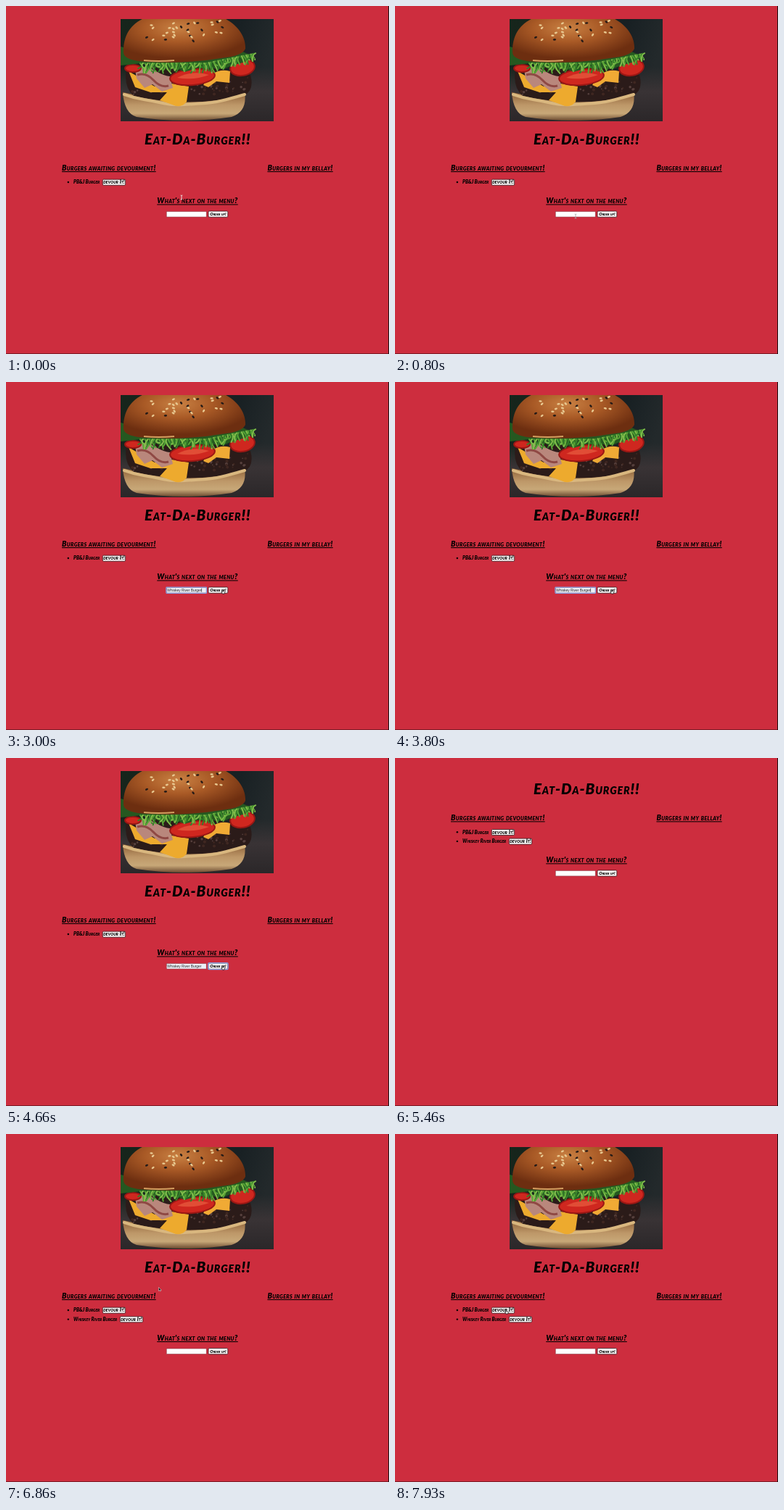
These frames come from a looping animation (528x480 px, 8 s). An HTML page:

```html
<!DOCTYPE html>
<html lang="en">
<head>
<meta charset="utf-8">
<title>Eat-Da-Burger!!</title>
<style>
  html, body { margin: 0; width: 100%; height: 100%; overflow: hidden; background: #cd2d3e; }
  svg { display: block; }
  .marker { font-family: Lato, "Open Sans", sans-serif; font-weight: 900; font-style: italic; font-variant: small-caps; }
  .title { font-size: 20.4px; letter-spacing: .045em; }
  .head { font-size: 10.3px; letter-spacing: .036em; text-decoration: underline; }
  .item { font-size: 6.5px; }
  .button rect { fill: #fbf8f8; stroke: #32171b; stroke-width: .8; }
  .button text { font-size: 6.6px; letter-spacing: .03em; text-anchor: middle; }
  .button .order { font-size: 5.7px; letter-spacing: 0; }
  .ring { fill: none; stroke: #85a5e8; stroke-width: 1.2; }
  .typed { font: 4.87px "Liberation Sans", Arial, sans-serif; fill: #222; }
  .pointer { fill: #fff; stroke: #000; stroke-width: .7; stroke-linejoin: round; }
</style>
</head>
<body>
<svg width="528" height="480" viewBox="0 0 528 480">
  <defs>
    <clipPath id="frame"><path d="M158 18H369V159H158z"/></clipPath>
    <filter id="soft"><feGaussianBlur stdDeviation=".5"/></filter>
    <linearGradient id="backdrop" x2="1" y2=".2">
      <stop stop-color="#16251b"/><stop offset=".75" stop-color="#182023"/><stop offset="1" stop-color="#23292b"/>
    </linearGradient>
    <linearGradient id="table" x2="0" y2="1">
      <stop stop-color="#3a3335" stop-opacity="0"/><stop offset=".45" stop-color="#393335"/><stop offset="1" stop-color="#2b2729"/>
    </linearGradient>
    <radialGradient id="crown" cx=".45" cy=".3" r=".62">
      <stop stop-color="#c98143"/><stop offset=".45" stop-color="#a95a26"/><stop offset="1" stop-color="#6d2e10"/>
    </radialGradient>
    <linearGradient id="heel" x2="0" y2="1">
      <stop stop-color="#8d6138"/><stop offset=".45" stop-color="#bd9768"/><stop offset=".75" stop-color="#c8a878"/><stop offset="1" stop-color="#6b4a30"/>
    </linearGradient>
  </defs>
  <rect width="528" height="480" fill="#cd2d3e"/>

  <g id="page">
    <g id="photo" clip-path="url(#frame)">
      <path fill="url(#backdrop)" d="M158 18H369V159H158z"/>
      <path fill="url(#table)" d="M158 84H369V159H158z"/>
      <g filter="url(#soft)">
        <path fill="url(#heel)" d="M161 119Q245 138 329 119Q333 146 311 153Q246 163 180 153Q163 148 161 119z"/>
        <path fill="#2b1b19" d="M166 88Q250 74 337 95Q343 117 327 124Q250 141 176 124Q162 112 166 88z"/>
        <g id="crumbs"/>
        <path fill="none" stroke="#d9b77f" stroke-width="4" stroke-linecap="round" d="M163 122Q177 127 190 129T216 134T246 136T276 134T304 129T329 122"/>
        <path fill="#edaa2e" d="M169 90L205 111L222 106L252 111L249 132Q241 142 229 136L212 130L222 119L199 119L178 112z"/>
        <path fill="#f0aa35" d="M272 109Q286 84 309 90L308 106L290 104L279 112z"/>
        <path fill="#b9877c" d="M178 88Q191 81 205 89T226 97L230 113L215 118L202 108L191 113L180 100z"/>
        <path fill="none" stroke="#8f4944" stroke-width="3" d="M181 95Q193 91 203 102T224 110"/>
        <g fill="#cf271f" stroke="#9b1714" stroke-width="2">
          <ellipse cx="257" cy="98" rx="31" ry="11" transform="rotate(-5 257 98)"/>
          <ellipse cx="326" cy="85" rx="17" ry="11" transform="rotate(-10 326 85)"/>
          <ellipse cx="175" cy="86" rx="11" ry="5"/>
        </g>
        <path fill="#e14d36" d="M236 99Q257 88 280 95Q258 103 236 99z"/>
        <path fill="#255820" d="M158 56Q174 60 188 68L222 75L270 72L324 62L338 68L330 77L312 82L300 87L266 85L246 91L235 86L211 87L196 78L177 80L158 82z"/>
        <g id="leaves" fill="none" stroke-width="2" stroke-linecap="round"/>
        <path fill="url(#crown)" d="M162 65C161 36 176 16 214 10H281C314 17 331 39 330 59Q326 68 303 71Q252 80 196 77Q164 76 162 65z"/>
        <path fill="none" stroke="#d49f60" stroke-width="2" d="M190 75Q210 77 232 75"/>
        <g id="seeds"/>
      </g>
    </g>

    <g class="marker">
      <text class="title" x="264.3" y="191" text-anchor="middle">Eat-Da-Burger!!</text>
      <text class="head" x="77" y="227">Burgers awaiting devourment!</text>
      <text class="head" x="450.7" y="227" text-anchor="end">Burgers in my bellay!</text>
      <circle cx="85.8" cy="243" r="1.2"/>
      <text class="item" x="93" y="245.3">PB&amp;J Burger</text>
      <g class="button"><rect x="133.3" y="239.2" width="31.3" height="8" rx="1.3"/><text x="149" y="245.4">devour It!</text></g>
      <g id="added">
        <circle cx="85.8" cy="255.6" r="1.2"/>
        <text class="item" x="93" y="257.9">Whiskey River Burger</text>
        <g class="button"><rect x="157.3" y="251.8" width="31.3" height="8" rx="1.3"/><text x="173" y="258">devour It!</text></g>
      </g>
    </g>

    <g id="form">
      <text class="marker head" x="264" y="272.4" text-anchor="middle">What's next on the menu?</text>
      <rect id="field" x="221.2" y="283.4" width="55" height="7.6" stroke="#8c3a45" stroke-width=".6"/>
      <rect id="fieldRing" class="ring" x="220.9" y="283.1" width="55.6" height="8.2" rx=".8"/>
      <text id="typed" class="typed" x="222.3" y="289"></text>
      <path id="caret" stroke="#111" stroke-width=".6" d="M0 284.6v5"/>
      <g class="button marker"><rect x="279" y="283" width="26.8" height="8.2" rx="1.3"/><text class="order" x="292.4" y="289.2">Order up!</text></g>
      <rect id="buttonRing" class="ring" x="278.6" y="282.6" width="27.6" height="9" rx="1.6"/>
    </g>
  </g>

  <g id="cursor">
    <path id="beam" fill="none" stroke="#eee" stroke-width=".9" d="M-1.3-3Q0-3 0-2Q0-3 1.3-3M0-2V2M-1.3 3Q0 3 0 2Q0 3 1.3 3"/>
    <path id="arrow" class="pointer" style="fill:#111;stroke:#eee;stroke-width:.5" d="M-1-2.5V2.5L.2 1.4L1 3L1.9 2.6L1.1 1.1H2.7z"/>
    <path id="hand" class="pointer" d="M-.9 1V-2.2Q-.3-3 .3-2.2V-.4L2.3 0Q2.9.3 2.6 1.4L2 3H-.6L-2.2.8Q-1.9 0-.9 1z"/>
  </g>
  <path fill="#7c1d28" d="M0 479h528v1H0z"/>
  <path fill="#1c0d10" d="M527 0h1v480h-1z"/>
</svg>
<script>
const LOOP = 8000, ORDER = "Whiskey River Burger";
const RELOAD = 5400, LOADED = 5650;
const $ = id => document.getElementById(id);
const show = (id, on) => $(id).style.display = on ? "" : "none";

let seed = 7;
const rand = (a, b) => a + (b - a) * ((seed = seed * 16807 % 2147483647) / 2147483647);
const repeat = (n, make) => Array.from({ length: n }, (_, i) => make(i)).join("");

$("seeds").innerHTML = repeat(32, i => {
  const x = rand(194, 305), y = rand(19, 53 - Math.abs(x - 245) * .15);
  return `<ellipse cx="${x}" cy="${y}" rx="2.2" ry="1.3" fill="${i % 3 ? "#e8c890" : "#251b18"}" transform="rotate(${rand(-60, 60)} ${x} ${y})"/>`;
});
$("leaves").innerHTML = repeat(75, i => {
  const x = 185 + i * 2.15, y = 79 - Math.max(0, x - 275) * .2;
  return `<path stroke="${["#58a536", "#347f29", "#82bd4c"][i % 3]}" d="M${x} ${y}q${rand(-6, 6)} ${rand(2, 6)} ${rand(-5, 6)} ${rand(5, 14)}"/>`;
});
$("crumbs").innerHTML = repeat(70, i =>
  `<circle cx="${rand(174, 334)}" cy="${rand(98, 122)}" r="${rand(.8, 2.3)}" fill="${i % 2 ? "#57413e" : "#3f2721"}"/>`);

// Cursor stops: time, x, y
const path = [
  [0, 242, 264], [60, 242, 264], [460, 249, 290], [2200, 249, 290],
  [2480, 270, 324], [2900, 299, 289], [5650, 299, 289],
  [6400, 222, 218], [6860, 211.5, 214], [7600, 153.5, 245], [8000, 153.5, 245]
];

function cursorAt(t) {
  const i = path.findIndex(p => p[0] > t);
  const [t0, x0, y0] = path[i - 1], [t1, x1, y1] = path[i];
  const u = (t - t0) / (t1 - t0), k = u * u * (3 - 2 * u);
  return [x0 + (x1 - x0) * k, y0 + (y1 - y0) * k];
}

function draw(t) {
  const loading = t >= RELOAD && t < LOADED, ordered = t >= RELOAD;
  const focused = t >= 1150 && t < 3900;
  const count = ordered ? 0 : Math.floor(Math.max(0, Math.min(1, (t - 1800) / 850)) * ORDER.length);

  $("page").setAttribute("transform", `translate(0 ${loading ? -140.7 : 0})`);
  $("form").setAttribute("transform", `translate(0 ${ordered ? 12.6 : 0})`);
  show("photo", !loading);
  show("added", ordered);

  $("typed").textContent = ORDER.slice(0, count);
  $("field").setAttribute("fill", count ? "#edf0f7" : "#fff");
  show("fieldRing", focused);
  show("buttonRing", t >= 3900 && !ordered);
  show("caret", focused && count > 0);
  $("caret").setAttribute("transform", `translate(${222.6 + $("typed").getComputedTextLength()} 0)`);

  const [x, y] = cursorAt(t);
  const hand = t >= 2800 && t < RELOAD || t >= 7450;
  const beam = t < 2250;
  $("cursor").setAttribute("transform", `translate(${x} ${y})`);
  $("beam").setAttribute("stroke", y > 283 ? "#aaa" : "#eee");
  show("cursor", !loading && !(t >= 1800 && t < 2200));
  show("hand", hand);
  show("beam", beam);
  show("arrow", !hand && !beam);
}

const start = performance.now();
function tick() {
  draw((performance.now() - start) % LOOP);
  requestAnimationFrame(tick);
}
tick();
</script>
</body>
</html>
```
